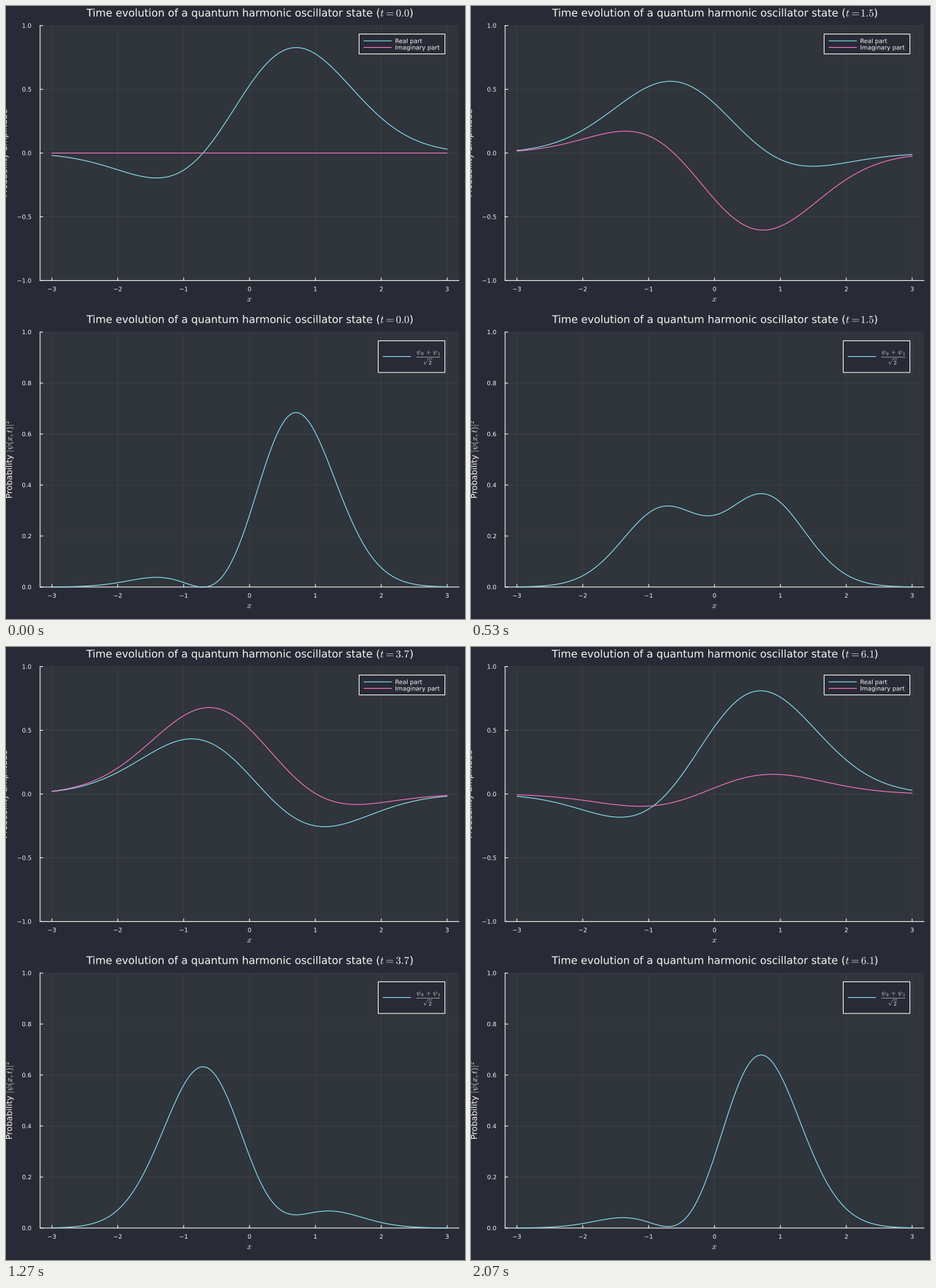
Animation, 648 px wide and 865 px high, one loop 2110 ms. Source, as a matplotlib script:

```python
import matplotlib.pyplot as plt
import numpy as np
from matplotlib.animation import FuncAnimation
from matplotlib.patches import PathPatch, Rectangle
from matplotlib.path import Path
from matplotlib.textpath import TextPath
from matplotlib.transforms import Affine2D

W, H, DPI = 648, 865, 72  # at 72 dpi one point is one pixel
BG, PANEL, FG = "#282a36", "#30343b", "#f8f8f2"
CYAN, PINK = "#8be9fd", "#ff79c6"
SMALL, GUIDE, TITLE = 8.5, 11.7, 14.87
LEFT, RIGHT, MID, UNIT = 48.1, 639.6, 343.8, 93.0
TOP, HEIGHT, SHIFT = 27.6, 359.8, 432.5
STEPS, LOOP = 63, 2110

plt.rcParams.update({"font.family": "DejaVu Sans", "mathtext.fontset": "cm",
                     "path.simplify": False})

fig = plt.figure(figsize=(W / DPI, H / DPI), dpi=DPI, facecolor=BG)
ax = fig.add_axes([0, 0, 1, 1])
ax.set_axis_off()
ax.set_xlim(0, W)
ax.set_ylim(H, 0)


def text_path(s, size):
    return TextPath((0, 0), s, size=size)


def span(path):
    xs = path.vertices[path.codes != Path.CLOSEPOLY, 0]
    return xs.min(), xs.max()


def row(first, size, *rest):
    """Follow a path with more text, given as (gap, string) pairs."""
    parts = [first]
    for gap, s in rest:
        x = span(parts[-1])[1] + gap
        parts.append(text_path(s, size).transformed(Affine2D().translate(x, 0)))
    return Path.make_compound_path(*parts)


def place(path, x, y, ha=0.5, angle=0):
    x0, x1 = span(path)
    dx = -(x0 + ha * (x1 - x0)) if ha else 0
    move = Affine2D().translate(dx, 0).rotate_deg(angle).scale(1, -1)
    return path.transformed(move.translate(x, y))


def draw(path):
    patch = PathPatch(path, facecolor=FG, linewidth=0, snap=False, zorder=5)
    return ax.add_artist(patch)


def label(s, x, y, size=SMALL, ha=0.5):
    return draw(place(text_path(s, size), x, y, ha))


def line(xs, ys, color=FG, lw=1.08, zorder=3, **kw):
    return ax.plot(xs, ys, color=color, lw=lw, zorder=zorder, snap=False,
                   solid_capstyle="round", **kw)[0]


def box(x0, y0, x1, y1, face, edge="none", zorder=1):
    ax.add_artist(Rectangle((x0, y0), x1 - x0, y1 - y0, facecolor=face,
                            edgecolor=edge, linewidth=1.08, zorder=zorder,
                            snap=False))


def px(x):
    return MID + UNIT * x


class Panel:
    def __init__(self, top, lo, hi, ticks):
        self.top, self.lo, self.hi = top, lo, hi
        self.bottom = bottom = top + HEIGHT
        box(LEFT, top, RIGHT, bottom, PANEL)
        for v in range(-3, 4):
            x = px(v)
            self.grid([x, x], [top, bottom])
            line([x, x], [bottom, bottom - 3.8])
            label(f"{v}".replace("-", "\u2212"), x, bottom + 15.0)
        for v in ticks:
            y = self.py(v)
            self.grid([LEFT, RIGHT], [y, y])
            line([LEFT, LEFT + 3.8], [y, y])
            label(f"{v:.1f}".replace("-", "\u2212"), 35.4, y + 3.1, ha=1)
        line([LEFT, LEFT, RIGHT], [top, bottom, bottom])
        label("$x$", MID - 0.3, bottom + 29.6, GUIDE)
        self.title = draw(Path([(0, 0)]))

    def grid(self, xs, ys):
        line(xs, ys, lw=0.55, alpha=0.1, zorder=2)

    def py(self, y):
        return self.bottom - HEIGHT * (y - self.lo) / (self.hi - self.lo)

    def guide(self, path, x):
        draw(place(path, x, self.top + HEIGHT / 2, angle=90))

    def curve(self, color):
        return line(px(X), 0 * X, color, zorder=4)


X = np.linspace(-3, 3, 301)
PHI0 = np.pi ** -0.25 * np.exp(-X ** 2 / 2)
HEAD = text_path("Time evolution of a quantum harmonic oscillator state (", TITLE)

amp = Panel(TOP, -1, 1, np.linspace(-1, 1, 5))
prob = Panel(TOP + SHIFT, 0, 1, np.linspace(0, 1, 6))
amp.guide(text_path("Probability amplitude", GUIDE), 1.2)
prob.guide(row(text_path("Probability", GUIDE), GUIDE,
               (3.9, r"$|\psi(x, t)|^2$")), 8.4)

real, imag = amp.curve(CYAN), amp.curve(PINK)
density = prob.curve(CYAN)

# Legends
box(498.5, 39.6, 619.6, 67.6, BG, FG, zorder=4.5)
for y, color, name in ((49.2, CYAN, "Real part"), (58.4, PINK, "Imaginary part")):
    line([505.2, 544.3], [y, y], color, zorder=5)
    label(name, 549.3, y + 3.1, ha=0)

box(525.5, 472.4, 619.6, 517.1, BG, FG, zorder=4.5)
line([532.2, 571.3], [494.6, 494.6], CYAN, zorder=5)
label(r"$\psi_{\,0}\, + \,\psi_{\,1}$", 596, 491.2, 9)
line([579.3, 612.9], [495.6, 495.6], lw=0.5, zorder=5)
label(r"$\sqrt{2}$", 595.6, 506)


def title(t):
    value = f"{t:.1f}"
    if value[0] == "1":  # the narrow digit sits closer
        value = r"\hspace{-0.1}" + value
    return row(HEAD, TITLE, (1.2, f"$t = {value}$"), (0.6, ")"))


def update(i):
    t = i / 10
    # Principal powers of the phase: the sign flips once t passes pi.
    z = np.exp(-1j * t)
    psi = PHI0 * (z ** 0.5 + np.sqrt(2) * X * z ** 1.5) / np.sqrt(2)
    real.set_ydata(amp.py(psi.real))
    imag.set_ydata(amp.py(psi.imag))
    density.set_ydata(prob.py(abs(psi) ** 2))
    text = title(t)
    for panel in (amp, prob):
        panel.title.set_path(place(text, 343.8, panel.top - 12.8))
    return real, imag, density, amp.title, prob.title


anim = FuncAnimation(fig, update, frames=STEPS, interval=LOOP / STEPS,
                     repeat=True, repeat_delay=0)
plt.show()
```
